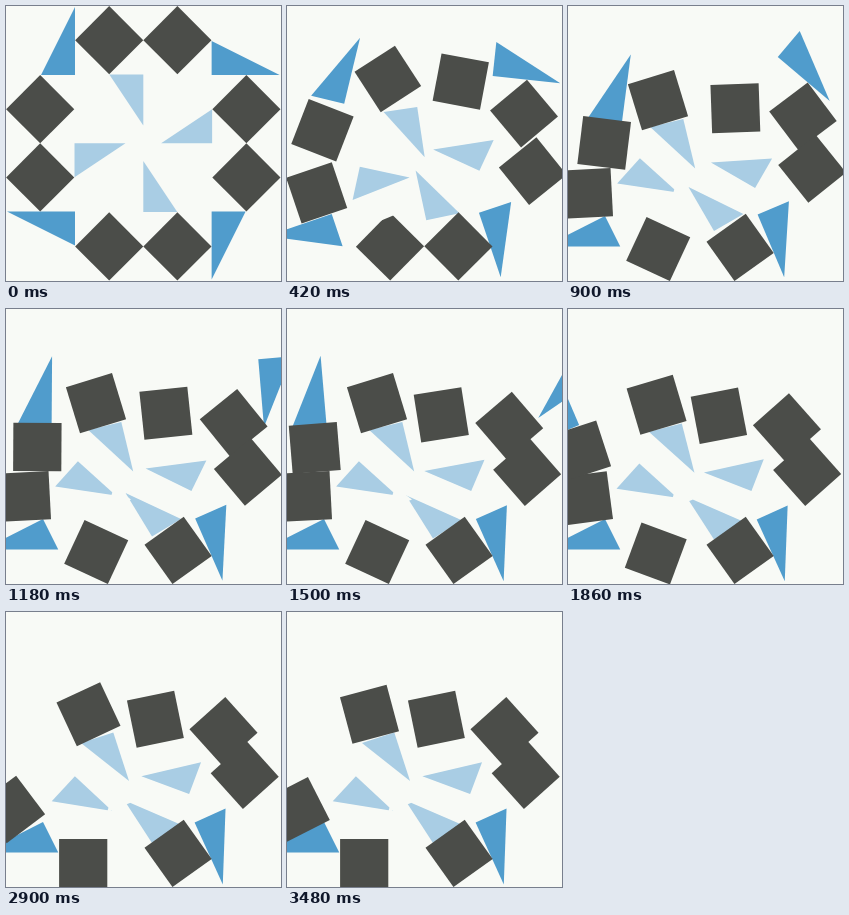
Recreate the animation shown at these times as an HTML page. Size 275 px wide and 275 px high, loop 3500 ms.

```html
<!DOCTYPE html>
<html lang="en">
<head>
<meta charset="utf-8">
<title>Falling pattern</title>
<style>
  html, body { margin: 0; width: 100%; height: 100%; overflow: hidden; background: #f8faf6; }
  svg { display: block; width: 100vw; height: 100vh; }
</style>
</head>
<body>
<svg id="stage" viewBox="0 0 275 275"></svg>
<script>
const LOOP = 3500;
const CENTER = 137.3;
const DARK = '#4b4d49', BLUE = '#509ccc', PALE = '#a9cde4', PAPER = '#f8faf6';
const stage = document.getElementById('stage');
const pieces = [];

const span = (t, from, to) => Math.min(1, Math.max(0, (t - from) / (to - from)));
const smooth = u => u * u * (3 - 2 * u);
const easeOut = u => 1 - (1 - u) ** 3;

// Progress of each phase; a piece adds up its own share [dx, dy, degrees] of them.
const PHASES = {
  fall: t => smooth(span(t, 0, 720)),
  tip: t => smooth(span(t, 380, 900)),
  slide: t => easeOut(span(t, 900, 2600)),
  late: t => smooth(span(t, 1500, 2800)),
  rock: t => Math.sin(Math.PI * span(t, 1900, 3480)) ** 2
};

function addPiece(points, fill, x, y, turn, moves) {
  const el = document.createElementNS('http://www.w3.org/2000/svg', 'polygon');
  el.setAttribute('points', points);
  el.setAttribute('fill', fill);
  stage.append(el);
  pieces.push({ el, start: [x, y, turn], moves: Object.entries(moves) });
}

// Repeats one shape at four quarter turns around the centre, clockwise.
function ring(points, fill, x, y, turn, ...moves) {
  let dx = x - CENTER, dy = y - CENTER;
  moves.forEach((move, i) => {
    addPiece(points, fill, CENTER + dx, CENTER + dy, turn + 90 * i, move);
    [dx, dy] = [-dy, dx];
  });
}

const SQUARE = '-24.1,-24.1 24.1,-24.1 24.1,24.1 -24.1,24.1';

// outer triangles, from top left
ring('0,0 0,-68 -34,0', BLUE, 69, 69, 0,
  { fall: [-19, 46, 22], tip: [4, 1, -14.5], slide: [-20, -2, -17], late: [-130, 10, -80] },
  { fall: [0, 2, 9], tip: [4, -20, 31], slide: [102, -2, 108], late: [140, 0, 0] },
  { fall: [-22, 2, -30], tip: [6, 1, 7], slide: [-1, 2, -1.5] },
  { fall: [-39, 4, -30], tip: [7, 0.5, 3.3] });

// inner triangles, from the top
ring('0,0 -34,0 0,51', PALE, 137.3, 68.5, 0,
  { fall: [-11, 52, -13.5], tip: [-11, -7.5, 0], late: [-8, 7.5, -4.5] },
  { fall: [-22, 44, 40], tip: [3, 0.7, -10], slide: [-4, 0, -9.5] },
  { fall: [3, 13, -19], tip: [5.7, 6, -11], slide: [0, 6, -3] },
  { fall: [7, 38, 19], tip: [-3.6, -23, 23], late: [-3, 12, 1] });

// squares, first and second of each side
ring(SQUARE, DARK, 103.2, 34.2, 45,
  { fall: [-3.5, 62, 19], tip: [-9.7, -2, 9], late: [-7.5, 8, 2], rock: [0, 0, -12] },
  { fall: [-5.4, 7, 8], slide: [-17.5, 8.8, -5] },
  { tip: [0.7, 1, 9.5] },
  { fall: [-7, 25, 42], tip: [-7.5, -9, 0], late: [-9.3, 10, -24], rock: [-6, 0, -12] });
ring(SQUARE, DARK, 171.4, 34.2, 45,
  { fall: [4, 66, -55], tip: [-8, 2, 8], slide: [-18, 5, -9.6] },
  { fall: [8.7, -10, 10], tip: [-5, 1.4, -3.7], slide: [-5.4, 0.2, -3.3] },
  { tip: [-13, 2.6, -20], late: [-13, 8, -25] },
  { fall: [2, 33.7, -38], slide: [-11.6, 2.7, -16], late: [-68, 13, -55] });

// paper-coloured piece that brushes the lower left square
addPiece('0,0 -7,22.5 17,12.5', PAPER, 95, 165, 0, { fall: [0, 48, 0], tip: [13, -35, 0] });

function draw(t) {
  for (const { el, start, moves } of pieces) {
    const pose = [...start];
    for (const [phase, move] of moves) {
      const p = PHASES[phase](t);
      move.forEach((v, i) => pose[i] += v * p);
    }
    const [x, y, r] = pose;
    el.setAttribute('transform', `translate(${x} ${y}) rotate(${r})`);
  }
}

const begin = performance.now();
function tick() {
  draw((performance.now() - begin) % LOOP);
  requestAnimationFrame(tick);
}
tick();
</script>
</body>
</html>
```
